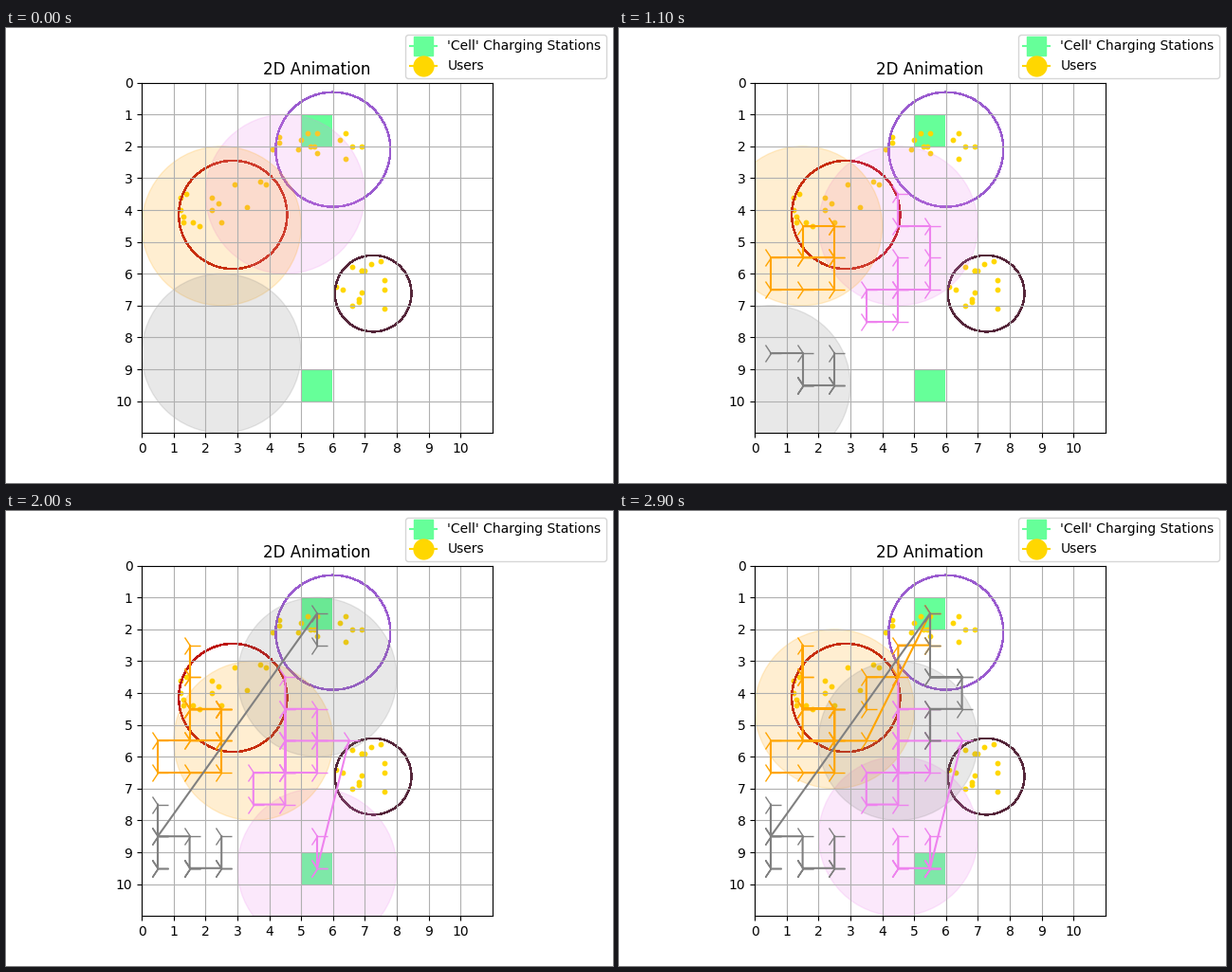
Write a matplotlib script that moves like this. It is 640 by 480 pixels and loops after 3 s.

```python
import numpy as np
import matplotlib.pyplot as plt
from matplotlib.animation import FuncAnimation
from matplotlib.patches import Circle, Rectangle

FRAMES, INTERVAL = 30, 100
GREEN, GOLD = "#66ff99", "gold"
REACH = 2.5
USERS = 15

STEPS = {"L": (-1, 0), "R": (1, 0), "U": (0, -1), "D": (0, 1), "H": (0, 0)}
STATIONS = {"N": (5.5, 1.5), "S": (5.5, 9.5)}  # jumps to a charging cell

# colour, start cell, one move per frame
DRONES = [
    ("violet", (4.5, 3.5), "DRDDL LDRUU UDDUR RSHUD HHHLH HHUH"),
    ("orange", (2.5, 4.5), "DLRDL LURUR LUUDD RLRDR NDUDL DLDL"),
    ("gray", (2.5, 8.5), "DHHLH HHHUL DHHHU UDNDD RLRDL DUDL"),
]

# colour, centre, radius, low and high corner of the users
CLUSTERS = [
    ("#9a5bcf", (6.0, 2.1), 1.8, (4.0, 1.5), (7.2, 2.4)),
    ("#bd1410", (2.86, 4.15), 1.7, (1.2, 2.8), (4.3, 4.5)),
    ("#55263a", (7.26, 6.62), 1.2, (6.1, 5.6), (7.9, 7.5)),
]


def walk(start, moves):
    """Turn a move string into the list of visited cells."""
    cells = [np.array(start)]
    for m in moves.replace(" ", ""):
        if m in STATIONS:
            cells.append(np.array(STATIONS[m]))
        else:
            cells.append(cells[-1] + STEPS[m])
    return np.array(cells)


def place_users(rng, center, radius, low, high):
    """Random users on a 0.1 raster, inside the box and close to the circle."""
    points = rng.uniform(low, high, (10 * USERS, 2)).round(1)
    near = np.hypot(*(points - center).T) < 1.1 * radius
    return points[near][:USERS]


fig, ax = plt.subplots(figsize=(6.4, 4.8), dpi=100)
ax.set_aspect("equal")
ax.set_xlim(0, 11)
ax.set_ylim(11, 0)
ax.set_xticks(range(11))
ax.set_yticks(range(11))
ax.grid(True)
ax.set_title("2D Animation")

for x, y in STATIONS.values():
    ax.add_patch(Rectangle((x - 0.5, y - 0.5), 0.97, 1, fc=GREEN, ec="none", zorder=0))

rng = np.random.default_rng(3)
for color, center, radius, low, high in CLUSTERS:
    users = place_users(rng, center, radius, low, high)
    ax.scatter(*users.T, s=10, color=GOLD)
    ax.add_patch(Circle(center, radius, fill=False, ec=color, lw=1, antialiased=False))

drones = []
for color, start, moves in DRONES:
    cells = walk(start, moves)
    area = ax.add_patch(Circle(start, REACH, color=color, alpha=0.18))
    trail, = ax.plot([], [], color=color, marker="4", markersize=16)
    drones.append((cells, area, trail))

handles = [
    ax.plot([], [], color=c, marker=m, markersize=15, label=text)[0]
    for c, m, text in [(GREEN, "s", "'Cell' Charging Stations"), (GOLD, "o", "Users")]
]
fig.legend(handles=handles)


def update(i):
    for cells, area, trail in drones:
        area.center = tuple(cells[i])
        trail.set_data(cells[:i, 0], cells[:i, 1])  # the trail lags one step
    return [artist for _, *pair in drones for artist in pair]


anim = FuncAnimation(fig, update, frames=FRAMES, interval=INTERVAL,
                     init_func=lambda: update(0), repeat=True, blit=False)
plt.show()
```
